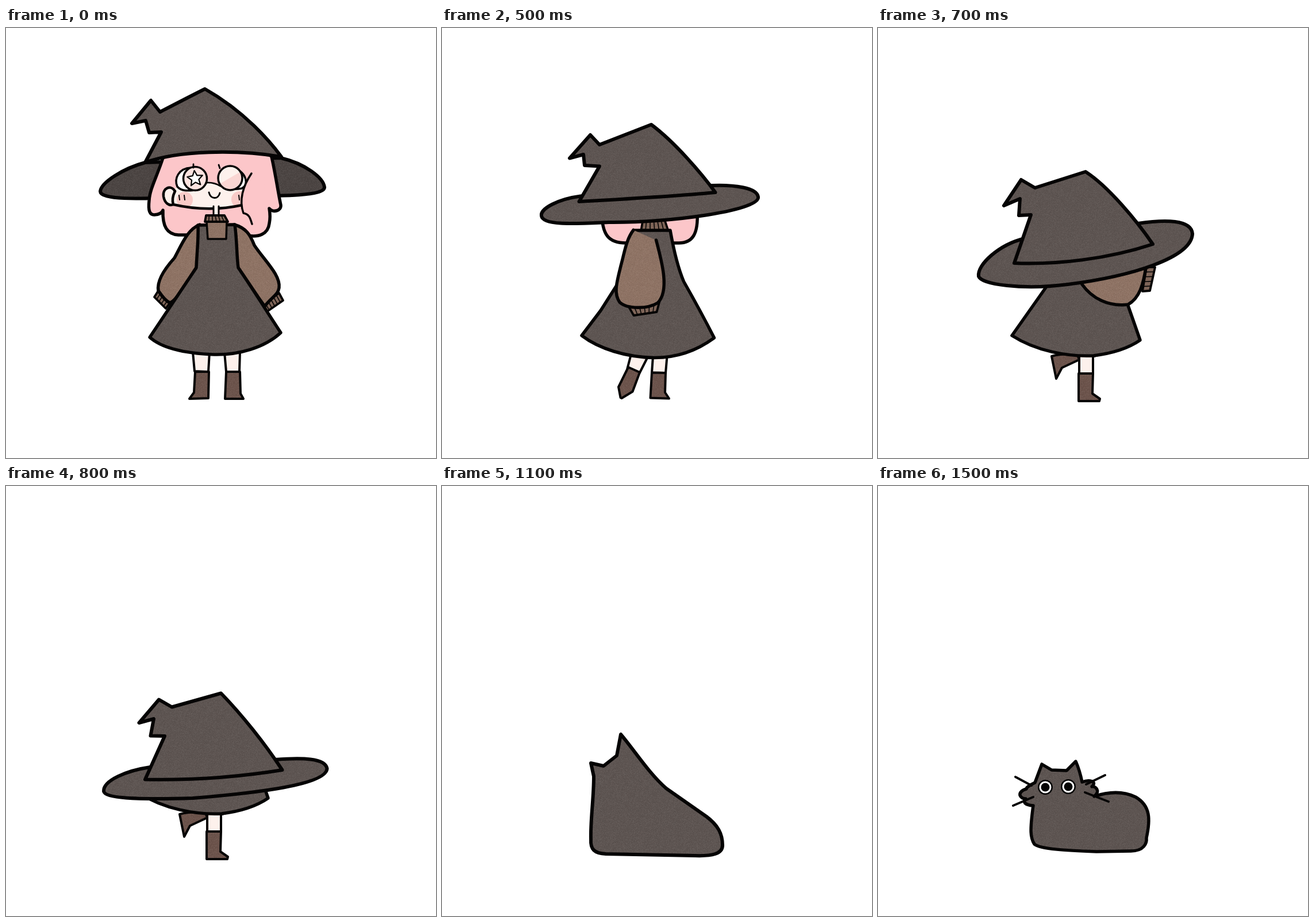
Animation of 748x748 px, one loop 1900 ms. Source, as an HTML page with a canvas:

```html
<!DOCTYPE html>
<html lang="en">
<head>
<meta charset="utf-8">
<title>Little witch</title>
<style>
html, body { margin: 0; width: 100%; height: 100%; overflow: hidden; background: #fff; }
canvas { display: block; width: 100vmin; height: 100vmin; }
</style>
</head>
<body>
<canvas id="stage" width="748" height="748"></canvas>
<script>
const ctx = document.getElementById('stage').getContext('2d');
ctx.lineJoin = ctx.lineCap = 'round';

const INK = '#050404', CLOTH = '#5d5451', UNDER = '#4b4442', WOOL = '#8f7364',
      CUFF = '#7f6558', BOOT = '#6c534b', HAIR = '#fcc6c9', SKIN = '#fdf1ec', BLUSH = '#f9cbc8';
const WOVEN = [CLOTH, UNDER, WOOL, CUFF, BOOT];

// Seeded fabric grain
const grain = (() => {
  const tile = document.createElement('canvas');
  tile.width = tile.height = 128;
  const g = tile.getContext('2d'), img = g.createImageData(128, 128);
  let seed = 7;
  for (let i = 0; i < img.data.length; i += 4) {
    seed = (seed * 16807) % 2147483647;
    const v = seed / 2147483647 - 0.5;
    img.data.fill(v > 0 ? 255 : 0, i, i + 3);
    img.data[i + 3] = Math.abs(v) * 30;
  }
  g.putImageData(img, 0, 0);
  return ctx.createPattern(tile, 'repeat');
})();

function fill(d, color) {
  const p = new Path2D(d);
  ctx.fillStyle = color;
  ctx.fill(p);
  if (WOVEN.includes(color)) {
    ctx.fillStyle = grain;
    ctx.fill(p);
  }
}

function line(d, width = 5.5) {
  ctx.strokeStyle = INK;
  ctx.lineWidth = width;
  ctx.stroke(new Path2D(d));
}

function shape(d, color, width) {
  fill(d, color);
  line(d, width);
}

function circle(x, y, r, color, width) {
  ctx.beginPath();
  ctx.arc(x, y, r, 0, Math.PI * 2);
  ctx.fillStyle = color;
  ctx.fill();
  if (width) {
    ctx.strokeStyle = INK;
    ctx.lineWidth = width;
    ctx.stroke();
  }
}

const nums = s => s.match(/[\d.]+/g).map(Number);

// Blend two strings that share the same commands
function mix(a, b, k) {
  const to = nums(b);
  let i = 0;
  return a.replace(/[\d.]+/g, n => (n * (1 - k) + to[i++] * k).toFixed(1));
}

function mixAll(a, b, k) {
  if (typeof a === 'string') return mix(a, b, k);
  const out = Array.isArray(a) ? [] : {};
  for (const key in a) if (key in b) out[key] = mixAll(a[key], b[key], k);
  return out;
}

// Four corners: two along the top edge, two back along the bottom
function ribbed(quad, n) {
  const [ax, ay, bx, by, cx, cy, dx, dy] = nums(quad);
  shape(`M${ax} ${ay} L${bx} ${by} L${cx} ${cy} L${dx} ${dy}Z`, CUFF, 3.8);
  for (let i = 1; i < n; i++) {
    const k = i / n, at = (p, q) => p + (q - p) * k;
    line(`M${at(ax, bx)} ${at(ay, by)} L${at(dx, cx)} ${at(dy, cy)}`, 1.6);
  }
}

const hats = {
  front: {
    cone: 'M479 224 C460 198 415 145 346 106 C320 119 295 132 268 146 L252 126 L219 166 L243 161 L249 182 L270 181 L242 234',
    rim: 'C300 213 400 211 479 224',
    brim: 'M242 234 C205 244 166 268 164 284 C164 299 230 298 300 294 C420 290 554 298 554 277 C552 260 520 236 478 226Z'
  },
  dip: {
    cone: 'M478 254 C455 220 410 165 366 131 L276 164 L264 145 L222 183 L247 178 L249 197 L274 199 L240 260',
    rim: 'C310 244 400 245 478 254',
    brim: 'M240 261 C200 265 165 280 168 292 C172 310 230 305 300 302 C400 312 556 306 555 285 C553 268 515 254 478 253Z'
  },
  side: {
    cone: 'M473 318 C450 288 400 232 362 205 L272 242 L252 227 L222 270 L245 262 L247 281 L274 282 L237 344',
    rim: 'C310 352 405 341 473 318',
    brim: 'M242 324 C205 330 176 348 178 362 C180 378 230 376 280 374 C400 366 550 328 545 303 C543 287 500 291 460 295Z'
  },
  back: {
    cone: 'M478 376 C450 335 400 275 361 250 L273 278 L249 264 L219 309 L247 297 L245 326 L266 325 L237 409',
    rim: 'C310 412 400 402 478 376',
    brim: 'M255 366 C210 377 172 412 175 432 C180 446 250 456 330 446 C440 432 545 400 547 358 C545 333 500 333 452 340Z'
  },
  floor: {
    cone: 'M483 612 C450 560 420 520 387 471 L304 491 L283 479 L244 515 L267 513 L258 543 L286 545 L247 612',
    rim: 'C320 612 400 612 483 612',
    brim: 'M247 612 C210 613 166 612 165 630 C164 639 190 636 320 640 C430 636 570 640 570 625 C566 613 530 612 483 612Z'
  }
};

function cone(hat, open) {
  fill(hat.cone + hat.rim + 'Z', CLOTH);
  line(hat.cone + (open ? '' : hat.rim + 'Z'), 6);
}

function wholeHat(hat, open) {
  shape(hat.brim, CLOTH, 6);
  cone(hat, open);
}

const bodies = {
  front: {
    dress: 'M334 343 L398 342 C402 370 401 395 404 417 C430 455 455 495 478 530 C450 556 405 569 362 568 C310 566 270 556 250 538 L331 417 C332 390 335 370 334 343Z',
    legs: [
      ['M325 564 L328 597 L352 598 L354 564', 'M329 598 L353 598 L352 644 L319 645 L327 634Z'],
      ['M380 564 L383 598 L406 598 L407 564', 'M383 598 L407 598 L408 636 L413 645 L381 645Z']
    ]
  },
  dip: {
    dress: 'M338 342 L398 342 C403 365 402 395 408 417 C430 455 455 500 474 540 C440 565 400 575 360 574 C310 572 265 555 244 535 L276 499 L338 400Z',
    sleeve: 'M334 343 C312 354 303 380 290 402 C272 430 254 452 260 474 C270 491 308 494 327 486 C341 472 334 400 338 343',
    cuff: '270 486 322 490 315 503 273 500',
    legs: [
      ['M322 572 L319 598 L345 601 L350 572', 'M319 598 L345 601 L337 645 L301 653 L299 647 L313 636Z'],
      ['M375 572 L373 599 L398 600 L400 572', 'M374 599 L398 600 L396 636 L403 644 L370 642Z']
    ]
  },
  side: {
    dress: 'M333 362 L396 362 C400 390 415 430 433 465 C448 492 460 515 473 538 C450 555 420 572 380 573 C330 574 280 560 242 535 L276 484 L333 396Z',
    sleeve: 'M332 360 C329 380 331 405 333 422 C336 455 342 470 358 480 C375 488 408 484 424 470 C452 440 430 410 407 395 C395 385 385 376 375 362',
    cuff: '381 486 434 464 432 485 394 500',
    legs: [
      ['M334 570 L326 586 L343 598 L367 570', 'M329 582 L343 597 L326 620 L324 635 L322 639 L301 613Z'],
      ['M359 570 L357 600 L380 600 L383 570', 'M356 600 L380 600 L380 632 L387 645 L355 645Z']
    ]
  },
  back: {
    dress: 'M300 440 L420 440 L456 543 C440 554 415 565 375 570 C330 572 275 562 233 535Z',
    legs: [
      ['M342 566 L350 578 L390 567', 'M302 571 C320 566 335 567 347 568 L350 577 L320 591 L310 610Z'],
      ['M350 570 L350 601 L374 601 L374 570', 'M349 601 L374 601 L373 636 L386 645 L385 649 L349 649Z']
    ]
  }
};

function legs(body) {
  for (const [skin, boot] of body.legs) {
    shape(skin, SKIN, 4);
    shape(boot, BOOT, 4);
  }
}

function frontSleeve(body) {
  ribbed(body.cuff, 6);
  shape(body.sleeve, WOOL);
}

function neck(x, y, bib, collar) {
  shape(`M${x} ${y} L${x} ${y + 18} L${x + 9} ${y + 18} L${x + 9} ${y}`, SKIN, 3);
  shape(bib, WOOL, 3.5);
  ribbed(collar, 6);
}

function ticks(y, ...xs) {
  for (const x of xs) line(`M${x} ${y} l1 8`, 2);
}

function face(outline, cheeks) {
  fill(outline, SKIN);
  ctx.save();
  ctx.clip(new Path2D(outline));
  for (const [x, y] of cheeks) circle(x, y, 14, BLUSH);
  ctx.restore();
}

function glasses() {
  shape('M322 243 C300 244 292 262 298 276 C306 285 318 283 330 282', '#fff', 3.5);
  shape('M395 243 C421 252 422 275 410 279 C400 281 390 280 385 279', '#fff', 3.5);
  circle(329, 262, 20.5, '#fde3e0', 3.5);
  circle(390, 261, 21, SKIN);
  fill('M372 271 L408 250 C416 270 396 285 382 281Z', '#fad6d3');
  ctx.beginPath();
  ctx.arc(390, 261, 21, 0, 7);
  ctx.stroke();
  line('M348 269 Q361 268 373 275 M326 237 v6 M370 238 l2 6', 2.8);
  let star = '';
  for (let i = 0; i < 10; i++) {
    const a = i * Math.PI / 5 - Math.PI / 2 - 0.1, r = i % 2 ? 6.5 : 14;
    star += `${i ? 'L' : 'M'}${329 + r * Math.cos(a)} ${262 + r * Math.sin(a)}`;
  }
  shape(star + 'Z', '#fff', 2.2);
}

function standing() {
  const b = bodies.front;
  shape(hats.front.brim, UNDER, 6);
  shape('M273 226 C262 260 250 280 249 300 C247 318 250 325 258 325 C266 325 272 321 273 317 C272 345 280 359 300 360 L415 360 C440 366 456 358 458 340 C460 330 459 320 458 314 C465 322 479 318 478 308 C474 290 469 255 462 224 L440 200 L290 200Z', HAIR);
  face('M291 285 L299 273 L350 266 L375 274 L414 279 L410 309 C370 317 330 316 290 308Z', [[311, 299], [406, 298]]);
  shape('M294 284 C287 272 272 278 274 293 C276 305 284 310 291 307', SKIN, 4.5);
  line('M294 284 C290 292 289 301 291 307 C330 316 370 317 411 308', 4.5);
  glasses();
  line('M353 286 C356 298 369 299 372 287', 3);
  ticks(291, 301, 310, 405);
  fill('M427 253 C412 275 406 300 412 322 L448 318 L450 250Z', HAIR);
  line('M427 253 C412 275 405 300 413 322 C424 324 425 332 428 341', 3.5);
  legs(b);
  ribbed('265 457 286 477 278 488 258 468', 5);
  ribbed('446 482 475 461 482 474 453 494', 6);
  shape('M337 342 C316 350 306 376 293 400 C275 420 262 440 265 457 C269 463 276 474 285 478 C296 474 305 455 318 437 L331 417', WOOL);
  shape('M397 342 C418 348 425 360 432 378 C450 405 478 430 475 452 C473 465 463 467 450 484 L440 470 L404 417', WOOL);
  shape(b.dress, CLOTH);
  neck(361, 310, 'M349 337 L384 337 L383 367 L351 367Z', '348 326 380 326 386 337 346 337');
  cone(hats.front);
}

function dipping() {
  const b = bodies.dip;
  shape(hats.dip.brim, UNDER, 6);
  shape('M252 256 C250 285 247 310 249 328 C252 345 270 345 276 334 C276 355 290 370 310 371 L415 373 C440 376 450 362 449 343 C452 353 465 345 465 325 C468 300 465 275 462 252 L440 225 L275 225Z', HAIR);
  face('M287 290 L323 265 C332 276 340 282 350 284 L372 280 L414 281 L405 317 C360 323 320 322 284 314Z', [[309, 303], [405, 303]]);
  shape('M288 290 C278 276 262 285 264 301 C266 316 279 320 289 314', SKIN, 4.5);
  line('M288 290 C282 299 284 308 289 314 C325 323 360 322 406 317', 4.5);
  line('M286 292 C300 284 314 273 322 263 M310 256 C318 270 328 278 342 284 M362 260 C361 270 370 281 390 280', 3.2);
  line('M301 289 H340 M374 282 H414', 4.5);
  line('M353 292 C353 307 364 308 364 293', 3);
  ticks(298, 302, 311, 403);
  fill('M420 256 C415 280 405 305 405 327 L445 330 L450 250Z', HAIR);
  line('M420 256 C415 280 405 305 405 327 C408 338 421 334 424 339 L427 347', 4);
  legs(b);
  ribbed('441 456 449 459 446 472 438 468', 2);
  shape('M398 342 C408 350 416 368 426 388 C441 412 449 438 444 454 L437 463 L408 417', WOOL);
  shape(b.dress, CLOTH);
  neck(360, 320, 'M349 340 L388 340 L388 370 L351 370Z', '348 328 382 328 386 339 345 339');
  frontSleeve(b);
  cone(hats.dip);
}

function turning() {
  const b = mixAll(bodies.dip, bodies.side, 0.5);
  shape('M278 320 C278 360 290 374 320 374 L412 374 C436 374 446 358 444 320', HAIR);
  legs(b);
  ribbed('350 330 386 330 394 354 346 354', 6);
  shape(b.dress, CLOTH);
  frontSleeve(b);
  wholeHat(mixAll(hats.dip, hats.side, 0.5));
}

function sideOn() {
  const b = bodies.side;
  legs(b);
  shape(b.dress, CLOTH);
  shape('M383 355 L387 378 L396 384 L393 355Z', UNDER, 3);
  frontSleeve(b);
  wholeHat(hats.side);
}

function crouching() {
  legs(bodies.back);
  shape(bodies.back.dress, CLOTH);
  ribbed('467 416 460 458 473 457 482 416', 5);
  shape('M355 446 C372 470 400 485 435 481 C455 470 462 445 466 416', WOOL);
  wholeHat(hats.back);
}

function sinking() {
  legs(bodies.back);
  shape(bodies.back.dress, CLOTH);
  wholeHat(mixAll(hats.back, hats.floor, 0.5));
}

const blobs = {
  hat: 'M387 471 L304 491 L283 479 L244 515 L267 513 C258 543 270 580 247 612 C210 613 150 618 165 632 L530 637 C555 636 570 630 570 625 C565 612 520 612 483 612 L440 545 C425 525 410 505 387 471Z',
  lump: 'M311 432 L304 469 L281 487 L259 482 L264 505 C264 545 258 580 259 615 C258 632 265 639 285 640 L440 643 C470 644 488 640 488 625 C488 605 480 590 460 575 L390 526 C360 500 335 460 311 432Z',
  cat: 'M344 479 L328 495 L301 494 L285 484 L273 517 C264 560 262 600 272 622 C282 632 300 633 320 635 L430 635 C462 636 466 625 467 612 C474 580 474 552 440 540 L400 534 C378 540 356 530 344 479Z'
};

const blob = (a, b, k) => () => shape(mix(blobs[a], blobs[b], k), CLOTH, 6);

function cat(whiskers) {
  shape('M344 479 L328 495 L302 494 L285 484 L273 516 C262 521 257 526 258 527 C250 529 246 534 247 538 C249 543 254 544 257 544 C251 549 255 555 270 556 C264 600 265 612 272 623 C282 632 330 634 380 636 L440 635 C462 635 468 622 467 612 C474 580 474 556 448 541 C425 530 400 532 376 540 C388 530 378 522 372 523 C382 514 368 510 355 515 C352 500 348 488 344 479Z', CLOTH);
  for (const [x, y] of [[291, 524], [331, 523]]) {
    circle(x, y, 13, INK);
    circle(x, y, 10.5, '#fff');
    circle(x, y, 7.5, INK);
  }
  if (whiskers) line('M239 506 L267 521 M235 556 L270 541 M362 519 L395 503 M360 533 L401 549', 4);
}

function settling() {
  ctx.save();
  ctx.translate(0, 636);
  ctx.scale(1, 0.94);
  ctx.translate(0, -636);
  cat(false);
  ctx.restore();
}

const poses = [
  standing, dipping, turning, sideOn, crouching, sinking,
  () => wholeHat(hats.floor, true),
  blob('hat', 'lump', 0.5), blob('hat', 'lump', 1),
  blob('lump', 'cat', 0.45), blob('lump', 'cat', 0.85),
  settling, () => cat(true)
];

// First and last poses hold for 400 ms, the rest for 100 ms
const LOOP = 1900;
let shown = -1;

function draw() {
  const t = performance.now() % LOOP;
  const i = Math.max(0, Math.min(poses.length - 1, Math.floor((t - 300) / 100)));
  if (i !== shown) {
    shown = i;
    ctx.fillStyle = '#fff';
    ctx.fillRect(0, 0, 748, 748);
    poses[i]();
  }
  requestAnimationFrame(draw);
}
draw();
</script>
</body>
</html>
```
